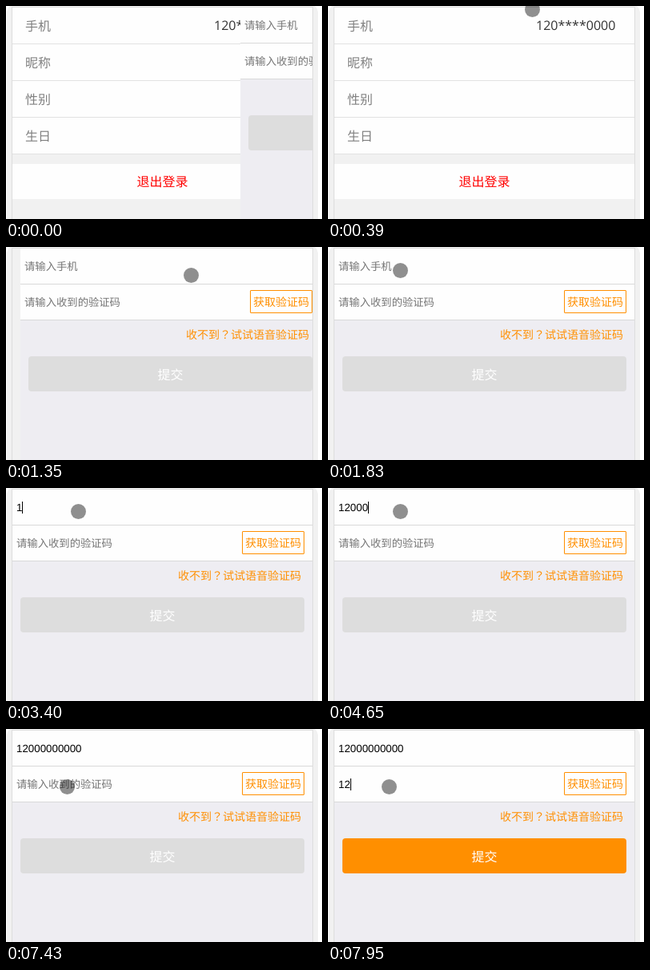
Recreate the animation shown at these times as an HTML page. Size 395 by 267 pixels, loop 8000 ms.

```html
<!DOCTYPE html>
<html lang="zh-CN">
<head>
<meta charset="utf-8">
<title>更换手机</title>
<style>
  :root { --orange: #ff8f00; --cjk: "Noto Sans CJK SC", "Noto Sans CJK", sans-serif; }
  * { box-sizing: border-box; }
  html, body { margin: 0; width: 100%; height: 100%; overflow: hidden; background: #fff; }
  body { position: relative; font: 16px var(--cjk); white-space: nowrap; text-rendering: geometricPrecision; }
  body div, .typed, .hint { position: absolute; }

  .anim { animation: 8s step-end infinite; }

  .frame { left: 1px; top: -3px; width: 389px; height: 290px; border-radius: 12px; background: #f1f1f1; }
  .edge { left: 7px; top: 1px; width: 377px; height: 290px; border: 1px solid #ddd; }
  .screen { left: 8px; top: 2px; width: 375px; height: 265px; overflow: hidden; }
  .page { inset: 0; }

  /* Profile page */
  .settings { animation-name: settings; }
  .item { left: 0; width: 100%; height: 46px; padding-left: 16px; line-height: 45px;
          color: #808080; background: #fefefe; border-bottom: 1px solid #e2e2e2; }
  .phone { left: 252px; color: #333; font-family: "Open Sans", sans-serif; }
  .logout { top: 196px; width: 100%; height: 44px; line-height: 43px; text-align: center;
            color: #f00; background: #fefefe; }

  /* Phone form */
  .form { background: #eeedf2; animation-name: slide; }
  .row { left: 0; width: 100%; height: 45px; background: #fefefe; border-bottom: 1px solid #d9d9d9; }
  .hint { left: 5px; top: 0; line-height: 44px; font-size: 13.333px; color: #757575; }
  .typed { left: 5px; top: 15px; height: 15px; width: 0;
           font: 13.333px/15px "Liberation Sans", Arial, sans-serif; color: #000; }
  .typed span { display: block; width: 100%; overflow: hidden; }
  .typed i { position: absolute; left: 100%; top: 0; width: 1px; height: 15px; background: #000; opacity: 0; }
  .number { animation-name: number; }
  .number i { animation-name: caret1; }
  .code { animation-name: code; }
  .code i { animation-name: caret2; }
  .hint1 { animation-name: hint1; }
  .hint2 { animation-name: hint2; }
  .get { left: 287px; top: 52px; width: 78px; height: 29px; line-height: 29px; font-size: 14px;
         text-align: center; color: var(--orange); border: 1px solid var(--orange); border-radius: 1px; }
  .voice { right: 14px; top: 98px; line-height: 20px; font-size: 14px; color: var(--orange); }
  /* Traditional forms centre the full-width question mark */
  .voice span { font-family: "Noto Sans CJK TC", "Noto Sans CJK", sans-serif; }
  .submit { left: 10px; top: 135px; width: 355px; height: 44px; line-height: 44px; text-align: center;
            color: #fff; background: #ddd; border-radius: 4px; animation-name: submit; }

  .dot { left: 0; top: 0; width: 19px; height: 19px; border-radius: 50%;
         background: rgba(0, 0, 0, .435); opacity: 0; animation-name: dot; }

  @keyframes settings { 0% { visibility: visible } 13.5%, 100% { visibility: hidden } }

  @keyframes slide {
    0% { transform: translateX(285px) }
    1.5% { transform: translateX(345px) }
    3% { transform: translateX(375px) }
    15% { transform: translateX(130px) }
    16% { transform: translateX(45px) }
    16.875% { transform: translateX(10px) }
    20.375%, 100% { transform: none }
  }

  @keyframes dot {
    0% { opacity: 0 }
    4.5% { opacity: 1; transform: translate(246px, -5px) }
    6.25% { opacity: 1; transform: translate(289px, 4px) }
    8.125% { opacity: 1; transform: translate(318px, 11px) }
    10% { opacity: 1; transform: translate(329px, 14px) }
    15% { opacity: 1; transform: translate(296px, 20px) }
    16% { opacity: 1; transform: translate(258px, 24px) }
    16.875% { opacity: 1; transform: translate(222px, 26px) }
    20.375% { opacity: 1; transform: translate(140px, 23px) }
    21.625% { opacity: 1; transform: translate(98px, 21px) }
    22.875% { opacity: 1; transform: translate(81px, 20px) }
    80.875% { opacity: 1; transform: translate(74px, 41px) }
    82.75% { opacity: 1; transform: translate(69px, 57px) }
    85.875%, 100% { opacity: 1; transform: translate(67px, 63px) }
  }

  @keyframes number {
    0% { width: 0 }
    42.5% { width: 1ch }
    46% { width: 2ch }
    49.375% { width: 3ch }
    56.25% { width: 4ch }
    58.125% { width: 5ch }
    61.5% { width: 6ch }
    63.375% { width: 7ch }
    66.75% { width: 8ch }
    68.25% { width: 9ch }
    72% { width: 10ch }
    75.5%, 100% { width: 11ch }
  }
  @keyframes code { 0% { width: 0 } 96.25% { width: 1ch } 99.375%, 100% { width: 2ch } }

  @keyframes caret1 {
    0%, 31.375%, 54.75%, 80.875%, 100% { opacity: 0 }
    26.375%, 38.75%, 56.25% { opacity: 1 }
  }
  @keyframes caret2 {
    0%, 92.875% { opacity: 0 }
    85.875%, 96.25%, 100% { opacity: 1 }
  }

  @keyframes hint1 { 0% { opacity: 1 } 42.5%, 100% { opacity: 0 } }
  @keyframes hint2 { 0% { opacity: 1 } 96.25%, 100% { opacity: 0 } }
  @keyframes submit { 0% { background: #ddd } 96.25%, 100% { background: var(--orange) } }
</style>
</head>
<body>
  <div class="frame"></div>
  <div class="edge"></div>
  <div class="screen">
    <div class="page settings anim">
      <div class="item" style="top:0">手机<div class="phone" style="top:0">120****0000</div></div>
      <div class="item" style="top:46px">昵称</div>
      <div class="item" style="top:92px">性别</div>
      <div class="item" style="top:138px">生日</div>
      <div class="logout">退出登录</div>
    </div>
    <div class="page form anim">
      <div class="row" style="top:0">
        <span class="hint hint1 anim">请输入手机</span>
        <span class="typed number anim"><span>12000000000</span><i class="anim"></i></span>
      </div>
      <div class="row" style="top:45px">
        <span class="hint hint2 anim">请输入收到的验证码</span>
        <span class="typed code anim"><span>12</span><i class="anim"></i></span>
      </div>
      <div class="get">获取验证码</div>
      <div class="voice">收不到<span lang="zh-Hant">？</span>试试语音验证码</div>
      <div class="submit anim">提交</div>
    </div>
  </div>
  <div class="dot anim"></div>
</body>
</html>
```
